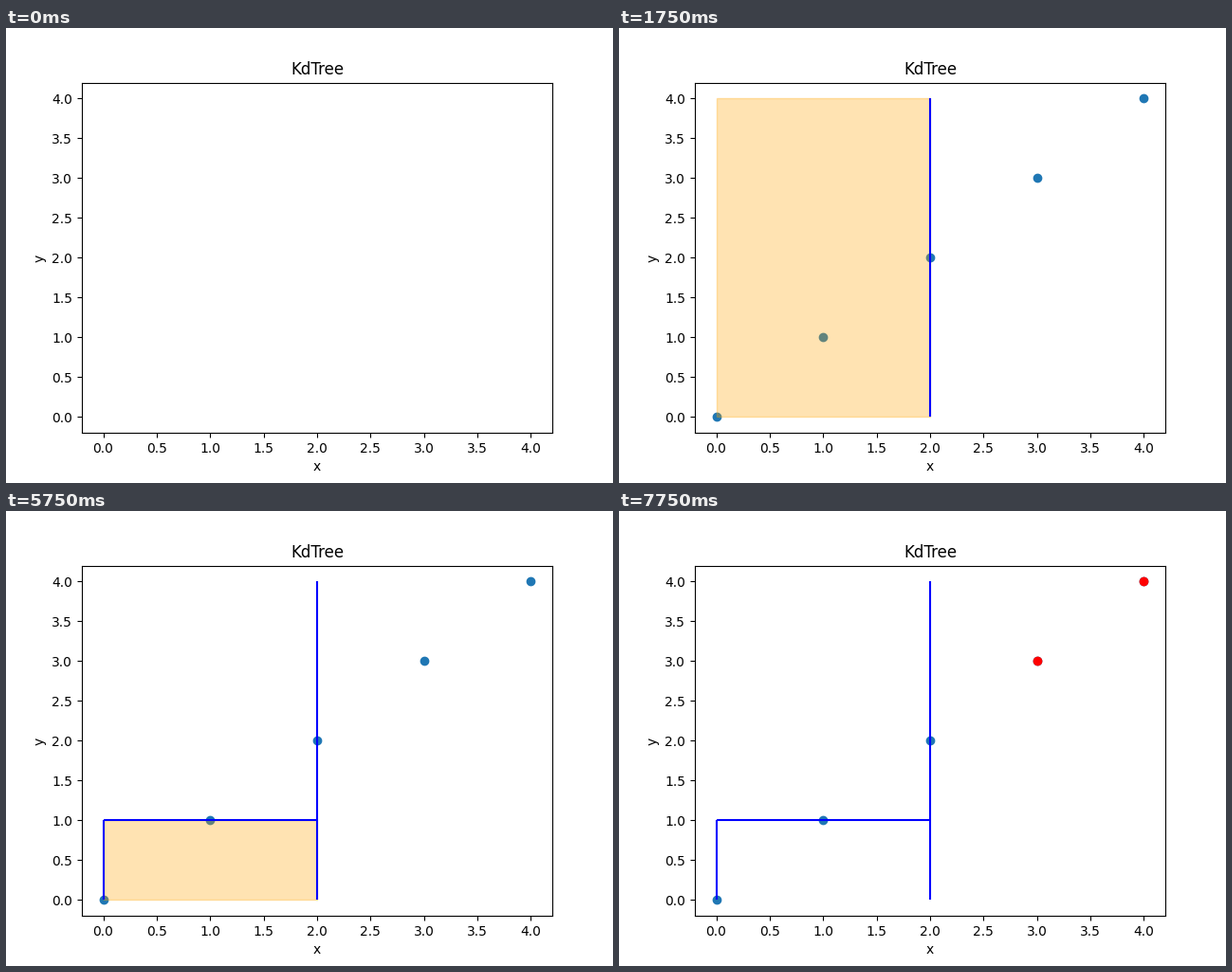
Animation of 640x480 px, one loop 8 s. Source, as a matplotlib script:

```python
import matplotlib.pyplot as plt
from itertools import islice
from matplotlib.animation import FuncAnimation
from matplotlib.patches import Rectangle

FRAMES = 32
INTERVAL = 250
POINTS = [(i, i) for i in range(5)]


def build(points, box, depth, lines):
    """Yield (lines, box, active points) for each step of building the tree."""
    def flash_box():
        yield list(lines), box, None
        yield list(lines), None, None

    def flash_points():
        yield list(lines), None, points
        yield list(lines), None, None

    if len(points) == 1:
        yield from flash_points()
        yield from flash_box()
        return

    yield from flash_box()
    yield from flash_points()

    x0, y0, x1, y1 = box
    mid = (len(points) - 1) // 2
    x, y = points[mid]
    if depth % 2 == 0:
        lines.append(((x, y0), (x, y1)))
        low, high = (x0, y0, x, y1), (x, y0, x1, y1)
    else:
        lines.append(((x0, y), (x1, y)))
        low, high = (x0, y0, x1, y), (x0, y, x1, y1)
    yield list(lines), None, None

    yield from build(points[:mid + 1], low, depth + 1, lines)
    yield from build(points[mid + 1:], high, depth + 1, lines)


def steps():
    yield None
    yield [], None, None
    yield from build(POINTS, (0, 0, 4, 4), 0, [])


STATES = list(islice(steps(), FRAMES))

fig, ax = plt.subplots(figsize=(6.4, 4.8), dpi=100)
ax.set(xlim=(-0.2, 4.2), ylim=(-0.2, 4.2), title="KdTree", xlabel="x", ylabel="y")

dots = ax.scatter(*zip(*POINTS))
active_dots = ax.scatter([], [], color="red")
region = ax.add_patch(Rectangle((0, 0), 1, 1, color="orange", alpha=0.3))
splits = ax.vlines([], 0, 1, color="blue")
ax.set(xlim=(-0.2, 4.2), ylim=(-0.2, 4.2))


def draw(i):
    state = STATES[i]
    dots.set_visible(state is not None)
    lines, box, active = state or ([], None, None)

    splits.set_segments(lines)
    active_dots.set_visible(active is not None)
    if active:
        active_dots.set_offsets(active)
    region.set_visible(box is not None)
    if box:
        x0, y0, x1, y1 = box
        region.set_bounds(x0, y0, x1 - x0, y1 - y0)
    return dots, active_dots, region, splits


anim = FuncAnimation(fig, draw, frames=FRAMES, init_func=lambda: draw(0),
                     interval=INTERVAL, repeat=True, repeat_delay=0)
plt.show()
```
